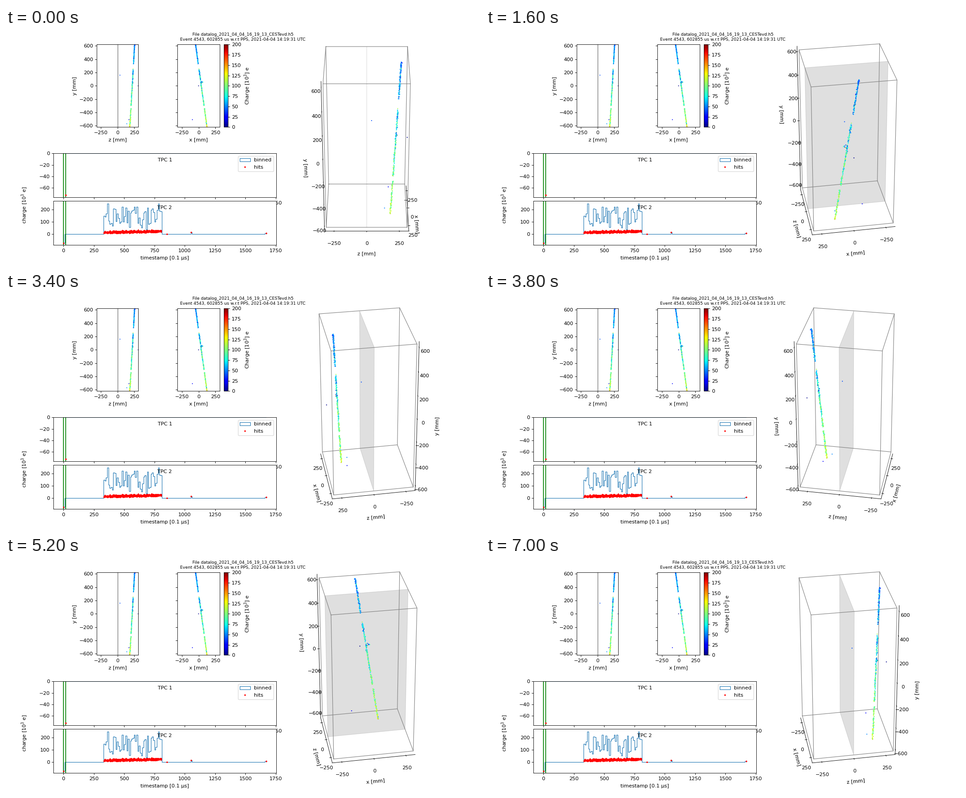
These frames come from a looping animation (1040x520 px, 7.2 s). A matplotlib script:

```python
import numpy as np
import matplotlib.pyplot as plt
from matplotlib.animation import FuncAnimation
from matplotlib.patches import Rectangle
from mpl_toolkits.mplot3d import art3d

W, H, DPI = 1040, 520, 80
FRAMES, INTERVAL = 36, 200
HALF, TALL = 310, 620
MARGIN = 25 / 24  # the 3D axis lines stand slightly outside the volume
rng = np.random.default_rng(7)

plt.rcParams.update({"font.family": "DejaVu Sans", "font.size": 10})
fig = plt.figure(figsize=(W / DPI, H / DPI), dpi=DPI, facecolor="white")


def add_axes(left, top, right, bottom, **kwargs):
    """Axes placed by pixel edges measured from the top left of the stage."""
    box = [left / W, 1 - bottom / H, (right - left) / W, (bottom - top) / H]
    return fig.add_axes(box, **kwargs)


def make_hits():
    """Straight track with two gaps plus stray hits: x, y, z and charge."""
    y = TALL - 2 * TALL * rng.random(460) ** 1.15
    y = y[~((y > 255) & (y < 315)) & ~((y > -340) & (y < -300))]
    x = 41 - 0.137 * y + rng.normal(0, 2.5, y.size)
    z = 220 + 0.0575 * y + rng.normal(0, 2.5, y.size)
    charge = np.clip(rng.normal(82 - 0.055 * y, 18), 10, 125)

    branch = np.array([50, 53, 226, 60]) + rng.normal(0, (6, 6, 3, 35), (8, 4))
    stray = [(23, 160, 37, 40), (0, 0, 309, 2), (-92, -508, 171, 22),
             (118, -570, 139, 52), (126, -618, 184, 165)]
    return np.hstack([(x, y, z, charge), branch.T, np.transpose(stray)])


x, y, z, charge = make_hits()
colors = dict(c=charge, cmap="jet", vmin=0, vmax=200, linewidths=0)

fig.suptitle("File datalog_2021_04_04_16_19_13_CESTevd.h5\n"
             "Event 4543, 602855 us w.r.t PPS, 2021-04-04 14:19:31 UTC",
             fontsize="small")

# Projections
ax_zy = add_axes(199, 36.4, 290.2, 218.4)
ax_xy = add_axes(376, 36.4, 469, 218.4)
ax_zy.axvline(0, color="gray", lw=1.3)
ax_zy.scatter(z, y, s=3, **colors)
points = ax_xy.scatter(x, y, s=3, **colors)
for ax, name, half in ((ax_zy, "z", HALF), (ax_xy, "x", 316)):
    ax.set(xlim=(-half, half), ylim=(-TALL, TALL), xlabel=f"{name} [mm]",
           xticks=(-250, 0, 250), yticks=range(-600, 601, 200))
ax_zy.set_ylabel("y [mm]")
ax_xy.set_yticklabels([])
bar = fig.colorbar(points, cax=add_axes(478.2, 36.4, 487.3, 218.4),
                   ticks=range(0, 201, 25))
bar.set_label("Charge [10$^3$] e")

# Charge against time
ax_t1 = add_axes(104, 276.4, 592.8, 373.2)
ax_t2 = add_axes(104, 381.4, 592.8, 478.4)
edges = np.arange(0, 1671, 10)
binned = np.zeros(edges.size - 1)
binned[33:81] = rng.uniform(35, 225, 48)
binned[[36, 78]] = 245
binned[[0, 105, 166]] = -73, 15, 8

for ax, weights in ((ax_t1, 0 * binned), (ax_t2, binned)):
    ax.hist(edges[:-1], bins=edges, weights=weights, histtype="step",
            color="C0", label="binned")
    for t in (0, 18):
        ax.axvline(t, color="green", lw=1.5)

t = rng.random(420)
hits = np.clip(14 + 11 * t + rng.normal(0, 5, t.size), 6 + 10 * t, 32 + 12 * t)
ax_t1.plot([18], [-73], "r.", ms=4, label="hits")
ax_t2.plot(332 + 474 * t, hits, "r.", ms=4)
ax_t2.plot([0, 852, 1050, 1670], [-73, 0, 15, 8], "r.", ms=4)

for i, (ax, ylim, yticks) in enumerate(
        ((ax_t1, (-77, 0), range(-60, 1, 20)),
         (ax_t2, (-87.5, 266), range(0, 201, 100))), 1):
    ax.set(xlim=(-83.5, 1753.5), ylim=ylim, yticks=yticks,
           xticks=range(0, 1751, 250))
    ax.set_title(f"TPC {i}", fontsize=10, y=0.75)
ax_t1.legend(loc="upper right")
ax_t2.set_xlabel("timestamp [0.1 µs]", labelpad=5.5)
fig.text(41 / W, 1 - 390 / H, "charge [10$^3$ e]", rotation=90,
         ha="center", va="center")

# Rotating detector volume, with the vertical axis showing y
ax_3d = add_axes(564.4, 26, 1006.4, 468, projection="3d")
ax_3d.patch.set_visible(False)
ax_3d.set_box_aspect((2, 2, 4))
wide, high = HALF * MARGIN, TALL * MARGIN
ax_3d.set(xlim=(-wide, wide), ylim=(-wide, wide), zlim=(-high, high),
          xticks=(-250, 0, 250), yticks=(-250, 0, 250),
          zticks=range(-600, 601, 200),
          xlabel="x [mm]", ylabel="z [mm]")
ax_3d.set_zlabel("y [mm]", labelpad=19)
ax_3d.grid(False)
for axis in (ax_3d.xaxis, ax_3d.yaxis, ax_3d.zaxis):
    axis.pane.set_visible(False)

ring = np.array([(-1, -1), (1, -1), (1, 1), (-1, 1), (-1, -1)]) * HALF
for level in (-TALL, TALL):
    ax_3d.plot(*ring.T, level, color="gray", lw=1)
for cx, cz in ring[:4]:
    ax_3d.plot([cx, cx], [cz, cz], [-TALL, TALL], color="gray", lw=1)

cathode = Rectangle((-HALF, -TALL), 2 * HALF, 2 * TALL, fc="gray", ec="gray",
                    lw=1, alpha=0.25)
ax_3d.add_patch(cathode)
art3d.pathpatch_2d_to_3d(cathode, z=0, zdir="y")
ax_3d.scatter(x, z, y, s=3.6, depthshade=False, **colors)


def update(frame):
    ax_3d.view_init(elev=30, azim=frame * 360 / FRAMES)
    return []


anim = FuncAnimation(fig, update, frames=FRAMES, interval=INTERVAL,
                     init_func=lambda: [], repeat=True, repeat_delay=0)
plt.show()
```
